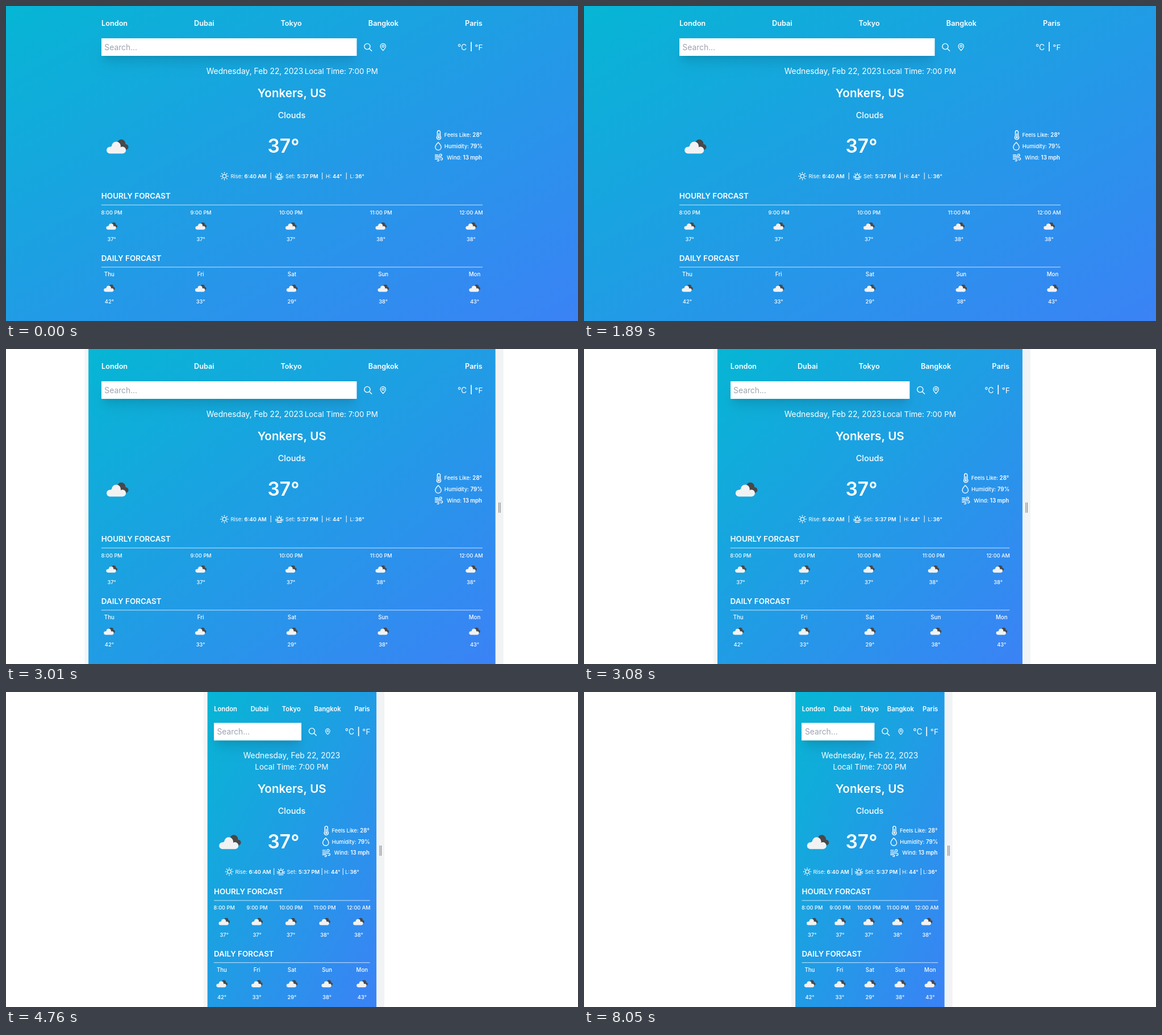
Animation of 1007 by 556 pixels, one loop 8120 ms. Source, as an HTML page with a canvas:

```html
<!DOCTYPE html>
<html lang="en">
<head>
<meta charset="utf-8">
<title>Responsive weather page</title>
<style>
  html, body { margin: 0; width: 100%; height: 100%; overflow: hidden; background: #fff; }
  canvas { display: block; }
</style>
</head>
<body>
<canvas id="stage" width="1007" height="556"></canvas>
<script>
const ctx = document.getElementById('stage').getContext('2d');
const LOOP = 8120, HEIGHT = 556, MID = 503.4;

// Viewport widths and the moments they take effect.
const VIEWS = [
  { at: 0, width: 716.5, full: true },
  { at: 1960, width: 716.5 },
  { at: 3080, width: 537 },
  { at: 4760, width: 297.5, narrow: true },
  { at: 6370, width: 262.5, narrow: true }
];

const NAV = ['London', 'Dubai', 'Tokyo', 'Bangkok', 'Paris'];
const NAV_SLOTS = [46.5, 38, 37.5, 56, 31];
const HOURS = ['8:00 PM', '9:00 PM', '10:00 PM', '11:00 PM', '12:00 AM'];
const HOUR_SLOTS = [36.5, 36.5, 39.5, 36.5, 40];
const HOUR_TEMPS = [37, 37, 37, 38, 38];
const DAYS = ['Thu', 'Fri', 'Sat', 'Sun', 'Mon'];
const DAY_SLOTS = [28, 28, 28, 28, 28];
const DAY_TEMPS = [42, 33, 29, 38, 43];

// Sun line: text, weight, x when wide, x when narrow
const SUN_LINE = [
  ['Rise:', 400, 395.5, 403.5], ['6:40 AM', 600, 419.5, 427.5], ['|', 500, 464.5, 470],
  ['Set:', 400, 492, 494.5], ['5:37 PM', 600, 512.5, 515], ['|', 500, 555, 554.5],
  ['H:', 400, 563, 560], ['44°', 600, 575, 572], ['|', 500, 597.5, 591.5],
  ['L:', 400, 605.5, 597], ['36°', 600, 614.5, 605.5]
];

// Line icons on a 24 unit grid
const ICONS = {
  search: 'M18 10.5a7.5 7.5 0 1 1-15 0a7.5 7.5 0 1 1 15 0M16 16l6 6',
  pin: 'M12 22C8 18 4.5 14.5 4.5 10a7.5 7.5 0 0 1 15 0C19.5 14.5 16 18 12 22zM15 10a3 3 0 1 1-6 0a3 3 0 1 1 6 0',
  thermometer: 'M8.5 14V4.5a3.5 3.5 0 0 1 7 0V14a5 5 0 1 1-7 0zM12 8v8M13.5 17.5a1.5 1.5 0 1 1-3 0a1.5 1.5 0 1 1 3 0',
  drop: 'M12 1.5C8 5.5 4 10 4 14.5a8 8 0 0 0 16 0C20 10 16 5.5 12 1.5z',
  wind: 'M2 9h15a3 3 0 1 0-3-3M2 5h8M2 13h17a3 3 0 1 1-2 5M2 17h8a2.5 2.5 0 1 1-2 4',
  sun: 'M17 12a5 5 0 1 1-10 0a5 5 0 1 1 10 0M12 1.5v2M12 20.5v2M1.5 12h2M20.5 12h2M4.6 4.6l1.4 1.4M18 18l1.4 1.4M4.6 19.4l1.4-1.4M18 6l1.4-1.4',
  sunset: 'M8 16a5 5 0 1 1 8 0M12 3v3M1.5 12.5h3M19.5 12.5h3M5 5.5l2 2M17 7.5l2-2M2 16.5h20M6 20.5h12'
};
for (const name in ICONS) ICONS[name] = new Path2D(ICONS[name]);

function text(str, x, y, size, weight = 400, align = 'center', color = '#fff') {
  ctx.font = `${weight} ${size}px Inter, sans-serif`;
  ctx.textAlign = align;
  ctx.fillStyle = color;
  ctx.fillText(str, x, y);
  return ctx.measureText(str).width;
}

function icon(name, x, y, scale = 0.64) {
  ctx.save();
  ctx.translate(x, y);
  ctx.scale(scale, scale);
  ctx.translate(-12, -12);
  ctx.lineWidth = 2;
  ctx.lineCap = ctx.lineJoin = 'round';
  ctx.strokeStyle = '#fff';
  ctx.stroke(ICONS[name]);
  ctx.restore();
}

function puffs(color, circles, x, y, w, h) {
  ctx.fillStyle = color;
  ctx.beginPath();
  for (const [cx, cy, r] of circles) {
    ctx.moveTo(cx + r, cy);
    ctx.arc(cx, cy, r, 0, Math.PI * 2);
  }
  ctx.rect(x, y, w, h);
  ctx.fill();
}

function cloud(x, y, scale) {
  ctx.save();
  ctx.translate(x, y);
  ctx.scale(scale, scale);
  puffs('#48484a', [[7, -5.2, 7.3], [14.5, 1, 5]], 5, -1, 9.5, 7);
  puffs('#f2f2f2', [[-13, 6.5, 6], [-8.5, 3.5, 4.5], [-2, -0.5, 8], [9, 6.4, 6.1]], -13, 4, 22, 8.5);
  ctx.restore();
}

// Centres of items laid out with equal gaps between them
function spread(slots, left, right) {
  const total = slots.reduce((a, b) => a + b);
  const gap = (right - left - total) / (slots.length - 1);
  let x = left;
  return slots.map(w => {
    const centre = x + w / 2;
    x += w + gap;
    return centre;
  });
}

function background(x, w) {
  const h = HEIGHT, k = w * h / (w * w + h * h);
  const cx = x + w / 2, cy = h / 2;
  const fill = ctx.createLinearGradient(cx - h * k, cy - w * k, cx + h * k, cy + w * k);
  fill.addColorStop(0, '#06b6d4');
  fill.addColorStop(1, '#3b82f6');
  ctx.fillStyle = fill;
  ctx.fillRect(x, 0, w, h);
}

function frameEdges(x, w) {
  ctx.fillStyle = '#f5f6f7';
  ctx.fillRect(x - 7, 0, 7, HEIGHT);
  ctx.fillStyle = '#f1f3f4';
  ctx.fillRect(x + w, 0, 14, HEIGHT);
  ctx.fillStyle = '#777';
  ctx.fillRect(x + w + 5.5, 271, 1, 18);
  ctx.fillRect(x + w + 8, 271, 1, 18);
}

function shadow(x, y, w, h, offset, blur, spreadBy) {
  ctx.save();
  ctx.shadowColor = 'rgba(0,0,0,.1)';
  ctx.shadowOffsetY = offset;
  ctx.shadowBlur = blur;
  ctx.fillStyle = '#fff';
  ctx.fillRect(x + spreadBy, y + spreadBy, w - 2 * spreadBy, h - 2 * spreadBy);
  ctx.restore();
}

function searchRow(left, right, y, narrow) {
  const w = (right - left) * 0.746 - 51, end = left + w;
  const boxLeft = Math.round(left);
  shadow(left, y, w, 31, 17, 21, 4);
  shadow(left, y, w, 31, 7, 8, 5);
  ctx.fillStyle = '#fff';
  ctx.fillRect(boxLeft, y, end - boxLeft, 31);
  text('Search...', left + 5.5, y + 20.5, 13.8, 400, 'left', '#9ca3af');
  icon('search', end + 19.5, y + 15.5, 0.68);
  icon('pin', end + 46.3, y + 15.3, narrow ? 0.52 : 0.62);
  text('°C', right - 44, y + 20.5, 13.8, 400, 'left');
  text('|', right - 20, y + 20, 13.8, 600);
  text('°F', right + 0.5, y + 20.5, 13.5, 400, 'right');
}

function details(right, y) {
  const rows = [
    ['thermometer', 'Feels Like:', '28°', 1],
    ['drop', 'Humidity:', '79%', 0],
    ['wind', 'Wind:', '13 mph', 1]
  ];
  rows.forEach(([name, label, value, inset], i) => {
    const rowY = y + i * 19.6;
    icon(name, right - 78 + inset, rowY, name === 'thermometer' ? 0.72 : 0.65);
    const valueWidth = text(value, right - inset, rowY + 3.4, 9.7, 600, 'right');
    text(label, right - inset - valueWidth - 2.6, rowY + 3.4, 9.4, 500, 'right');
  });
}

function forecast(title, labels, slots, temps, left, right, y) {
  text(title, left, y, 13.4, 600, 'left');
  ctx.fillStyle = 'rgba(255,255,255,.75)';
  ctx.fillRect(left, y + 10.4, right - left, 1);
  spread(slots, left, right).forEach((x, i) => {
    text(labels[i], x, y + 27.3, slots === DAY_SLOTS ? 9.7 : 9.2, 500);
    cloud(x, y + 48, 0.51);
    text(temps[i] + '°', x, y + 74.8, 9.3, 500);
  });
}

function draw({ width, full, narrow }) {
  const pad = narrow ? 11.3 : 22.7;
  const x = MID - width / 2;
  const left = x + pad, right = x + width - pad;
  const top = narrow ? -2.5 : 0, down = narrow ? 16.8 : 0;

  ctx.fillStyle = '#fff';
  ctx.fillRect(0, 0, 1007, HEIGHT);
  if (full) {
    background(0, 1007);
  } else {
    frameEdges(x, width);
    background(x, width);
  }

  const navScale = narrow ? 0.885 : 1;
  spread(NAV_SLOTS.map(w => w * navScale), left, right)
    .forEach((cx, i) => text(NAV[i], cx, 35 + top * 0.6, 12.7 * navScale, 600));
  searchRow(left, right, 57 + top, narrow);

  text('Wednesday, Feb 22, 2023', narrow ? 503 : 438, 119.7 + top, 13.8, 400);
  text('Local Time: 7:00 PM', narrow ? 503 : 590.3, narrow ? 136.5 : 119.7, 13.4, 400);
  text('Yonkers, US', 503.2, 160.7 + down, 20.6, 600);
  text('Clouds', 503, 197.8 + down, 14.5, 500);

  cloud(left + 28.2, 248 + down, 1);
  text('37°', 488.5, 258.8 + down, 33.5, 600);
  details(right, 228 + down);

  icon('sun', narrow ? 393 : 384.5, 300.3 + down);
  icon('sunset', narrow ? 484 : 481.2, 300.3 + down);
  for (const [str, weight, wideX, narrowX] of SUN_LINE)
    text(str, narrow ? narrowX : wideX, 303.9 + down, str === '|' ? 10 : 9.4, weight, 'left');

  forecast('HOURLY FORCAST', HOURS, HOUR_SLOTS, HOUR_TEMPS, left, right, 340.3 + down);
  forecast('DAILY FORCAST', DAYS, DAY_SLOTS, DAY_TEMPS, left, right, 450 + down);
}

function tick() {
  const time = performance.now() % LOOP;
  draw(VIEWS.filter(view => view.at <= time).pop());
  requestAnimationFrame(tick);
}
tick();
</script>
</body>
</html>
```
